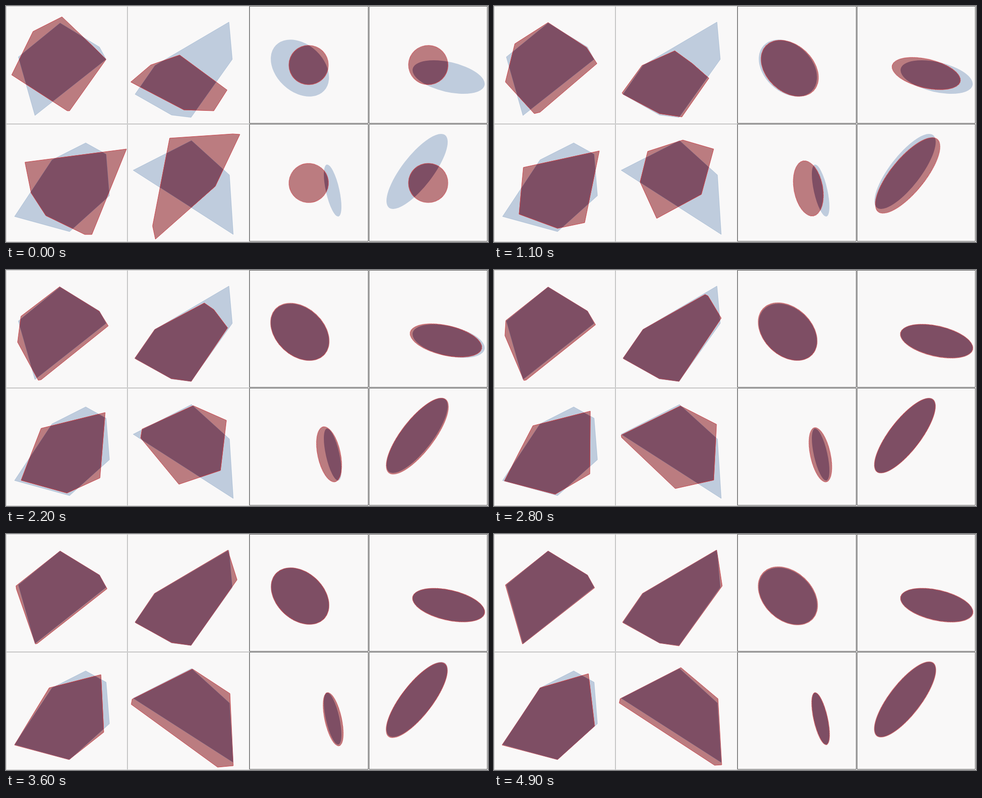
These frames come from a looping animation (1016x500 px, 5 s). An HTML page without scripts:

```html
<!DOCTYPE html>
<html lang="en">
<head>
<meta charset="utf-8">
<title>Shape fitting</title>
<style>
html, body { margin: 0; width: 100%; height: 100%; overflow: hidden; background: #f9f8f8; }
svg { display: block; width: 100%; height: 100%; }
.frame { fill: none; stroke: #c4c4c4; }
.dark { stroke: #4a4a4a; }
.goal { fill: #bfccdd; }
.edge { fill: none; stroke: #47a; stroke-opacity: .25; }
.fit { fill: #bb7c80; stroke: #c9444a; }
.both { fill: #7e4e64; }

/* Each segment advances in 100 ms steps */
.a, .b, .c, .d, .e, .f, .g, .h { animation: 5s infinite; }
.a { animation-name: a; }
.b { animation-name: b; }
.c { animation-name: c; }
.d { animation-name: d; }
.e { animation-name: e; }
.f { animation-name: f; }
.g { animation-name: g; }
.h { animation-name: h; }

@keyframes a {
  0% { d: path("M118 23L191 93L211 113L134 222L129 222L12 146L57 54Z"); animation-timing-function: steps(5); }
  10% { d: path("M117 31L192 88L214 117L127 213L100 218L18 153L51 68Z"); animation-timing-function: steps(6); }
  22% { d: path("M114 35L195 88L217 122L97 225L85 228L24 161L44 80Z"); animation-timing-function: steps(5); }
  32% { d: path("M112 35L196 88L217 121L80 232L73 233L26 167L38 89Z"); animation-timing-function: steps(12); }
  56% { d: path("M114 36L197 87L214 116L68 233L63 234L23 139L25 107Z"); animation-timing-function: steps(8); }
  72% { d: path("M114 36L197 87L213 116L66 232L62 233L22 117L21 110Z"); animation-timing-function: steps(13); }
  98%, to { d: path("M114 36L197 87L212 114L62 232L60 233L25 111L24 108Z"); }
}
@keyframes b {
  0% { d: path("M366 104L420 144L466 178L438 222L375 220L276 168L263 161L305 125Z"); animation-timing-function: steps(5); }
  10% { d: path("M372 100L415 132L456 162L406 233L378 230L276 179L271 169L312 123Z"); animation-timing-function: steps(6); }
  22% { d: path("M381 95L418 122L453 153L396 235L349 228L272 187L270 184L312 126Z"); animation-timing-function: steps(5); }
  32% { d: path("M391 88L425 113L455 143L391 236L348 230L272 188L271 187L313 126Z"); animation-timing-function: steps(12); }
  56% { d: path("M445 52L451 55L479 102L390 236L348 230L273 188L272 187L314 126Z"); animation-timing-function: steps(8); }
  72% { d: path("M468 34L471 46L487 97L390 236L349 230L273 188L272 187L313 126Z"); animation-timing-function: steps(13); }
  98%, to { d: path("M469 34L471 44L481 110L390 237L349 231L272 188L271 187L313 126Z"); }
}
@keyframes c {
  0% { transform: translate(638px, 125px) rotate(45deg); rx: 41.5px; ry: 41.5px; animation-timing-function: steps(5); }
  10% { transform: translate(631.5px, 129px) rotate(45deg); rx: 60px; ry: 43px; animation-timing-function: steps(6); }
  22% { transform: translate(623.5px, 132px) rotate(43.5deg); rx: 69px; ry: 49px; animation-timing-function: steps(5); }
  32% { transform: translate(620px, 131.5px) rotate(43.5deg); rx: 70px; ry: 50px; animation-timing-function: steps(12); }
  56% { transform: translate(619px, 130.5px) rotate(43.5deg); rx: 71px; ry: 50.5px; animation-timing-function: steps(8); }
  72% { transform: translate(620px, 131.5px) rotate(43.5deg); rx: 69.5px; ry: 49.5px; animation-timing-function: steps(13); }
  98%, to { transform: translate(619.5px, 131px) rotate(43.5deg); rx: 71.5px; ry: 51px; }
}
@keyframes d {
  0% { transform: translate(890px, 125px) rotate(24deg); rx: 41.5px; ry: 41.5px; animation-timing-function: steps(5); }
  10% { transform: translate(896.5px, 131px) rotate(22deg); rx: 53.8px; ry: 34.7px; animation-timing-function: steps(6); }
  22% { transform: translate(911px, 143px) rotate(13.3deg); rx: 73.6px; ry: 30.3px; animation-timing-function: steps(5); }
  32% { transform: translate(921.5px, 147.5px) rotate(13deg); rx: 76.1px; ry: 30.7px; animation-timing-function: steps(12); }
  56% { transform: translate(933px, 150.8px) rotate(13deg); rx: 78.2px; ry: 32px; animation-timing-function: steps(8); }
  72% { transform: translate(933px, 150.7px) rotate(13deg); rx: 77.8px; ry: 31.8px; animation-timing-function: steps(13); }
  98%, to { transform: translate(933.3px, 150.8px) rotate(13deg); rx: 78.2px; ry: 32px; }
}
@keyframes e {
  0% { d: path("M40 331L254 303L181 484L166 484L84 444L53 396Z"); animation-timing-function: steps(5); }
  10% { d: path("M56 338L236 307L188 469L146 474L63 435L60 400Z"); animation-timing-function: steps(6); }
  22% { d: path("M62 342L222 307L191 459L134 471L53 441L57 395Z"); animation-timing-function: steps(5); }
  32% { d: path("M66 341L215 305L194 449L128 470L42 444L54 392Z"); animation-timing-function: steps(12); }
  56% { d: path("M82 330L203 299L202 432L129 475L22 447L52 388Z"); animation-timing-function: steps(8); }
  72% { d: path("M91 326L200 298L206 420L133 478L18 447L54 387Z"); animation-timing-function: steps(13); }
  98%, to { d: path("M97 326L199 296L212 407L134 478L17 447L57 387Z"); }
}
@keyframes f {
  0% { d: path("M345 280L478 271L493 272L441 382L315 494L309 466Z"); animation-timing-function: steps(5); }
  10% { d: path("M340 290L405 278L471 292L436 393L333 465L312 402Z"); animation-timing-function: steps(6); }
  22% { d: path("M324 308L398 284L463 303L437 399L343 450L308 373Z"); animation-timing-function: steps(5); }
  32% { d: path("M306 324L396 287L460 310L441 404L347 445L299 357Z"); animation-timing-function: steps(12); }
  56% { d: path("M268 350L393 288L469 327L463 445L382 463L269 355Z"); animation-timing-function: steps(8); }
  72% { d: path("M266 350L393 286L472 338L479 491L446 494L264 361Z"); animation-timing-function: steps(13); }
  98%, to { d: path("M266 349L394 283L472 349L480 489L465 490L264 358Z"); }
}
@keyframes g {
  0% { transform: translate(638px, 375px) rotate(-17deg); rx: 41.5px; ry: 41.5px; animation-timing-function: steps(5); }
  10% { transform: translate(645px, 379px) rotate(-16deg); rx: 34.4px; ry: 50.2px; animation-timing-function: steps(6); }
  22% { transform: translate(662.5px, 386.5px) rotate(-10.5deg); rx: 30.1px; ry: 59.2px; animation-timing-function: steps(5); }
  32% { transform: translate(674px, 389.5px) rotate(-12deg); rx: 26.7px; ry: 60.5px; animation-timing-function: steps(12); }
  56% { transform: translate(688px, 391.5px) rotate(-12.4deg); rx: 20.9px; ry: 58.7px; animation-timing-function: steps(8); }
  72% { transform: translate(689.7px, 392.5px) rotate(-12.5deg); rx: 17.4px; ry: 57.7px; animation-timing-function: steps(13); }
  98%, to { transform: translate(688.5px, 391.3px) rotate(-12.6deg); rx: 14.5px; ry: 56.5px; }
}
@keyframes h {
  0% { transform: translate(890px, 375px) rotate(46deg); rx: 41.5px; ry: 41.5px; animation-timing-function: steps(5); }
  10% { transform: translate(883px, 368px) rotate(46deg); rx: 41.4px; ry: 63.4px; animation-timing-function: steps(6); }
  22% { transform: translate(872px, 359px) rotate(39deg); rx: 35.6px; ry: 98.8px; animation-timing-function: steps(5); }
  32% { transform: translate(868px, 353px) rotate(37.5deg); rx: 35.5px; ry: 99.5px; animation-timing-function: steps(12); }
  56% { transform: translate(866px, 351px) rotate(37.5deg); rx: 32.5px; ry: 96.5px; animation-timing-function: steps(8); }
  72% { transform: translate(865.7px, 352px) rotate(37.5deg); rx: 32.5px; ry: 97px; animation-timing-function: steps(13); }
  98%, to { transform: translate(866.5px, 350.5px) rotate(37.5deg); rx: 33px; ry: 97.3px; }
}
</style>
</head>
<body>
<svg viewBox="0 0 1016 500" preserveAspectRatio="none">
  <defs>
    <clipPath id="goals">
      <path d="M114 36L197 87L211 113L61 232L26 108Z"/>
      <path d="M470 34L477 113L390 236L349 231L272 187L314 126Z"/>
      <path d="M168 290L211 314L218 402L134 478L18 446L97 326Z"/>
      <path d="M391 285L471 358L479 484L268 348Z"/>
      <ellipse rx="70" ry="50" transform="translate(619.5 131.5) rotate(43.5)"/>
      <ellipse rx="77.7" ry="31.7" transform="translate(933 150.5) rotate(13)"/>
      <ellipse rx="14.2" ry="56.3" transform="translate(688.5 391) rotate(-12.6)"/>
      <ellipse rx="32.8" ry="97" transform="translate(866.5 350.5) rotate(37.5)"/>
    </clipPath>
  </defs>

  <rect class="goal" width="1016" height="500" clip-path="url(#goals)"/>

  <g class="fit">
    <path class="a"/>
    <path class="b"/>
    <ellipse class="c"/>
    <ellipse class="d"/>
    <path class="e"/>
    <path class="f"/>
    <ellipse class="g"/>
    <ellipse class="h"/>
  </g>
  <g class="fit both" clip-path="url(#goals)">
    <path class="a"/>
    <path class="b"/>
    <ellipse class="c"/>
    <ellipse class="d"/>
    <path class="e"/>
    <path class="f"/>
    <ellipse class="g"/>
    <ellipse class="h"/>
  </g>

  <path class="edge" d="M114 36L197 87L211 113L61 232L26 108Z
    M470 34L477 113L390 236L349 231L272 187L314 126Z
    M168 290L211 314L218 402L134 478L18 446L97 326Z
    M391 285L471 358L479 484L268 348Z"/>

  <path class="frame" d="M.5 .5H255.5V249.5H.5ZM256.5 .5H512.5V249.5H256.5Z
    M.5 250.5H255.5V499.5H.5ZM256.5 250.5H512.5V499.5H256.5Z"/>
  <path class="frame dark" d="M513.5 .5H763.5V248.5H513.5ZM765.5 .5H1014.5V248.5H765.5Z
    M513.5 250.5H763.5V498.5H513.5ZM765.5 250.5H1014.5V498.5H765.5Z"/>
</svg>
</body>
</html>
```
